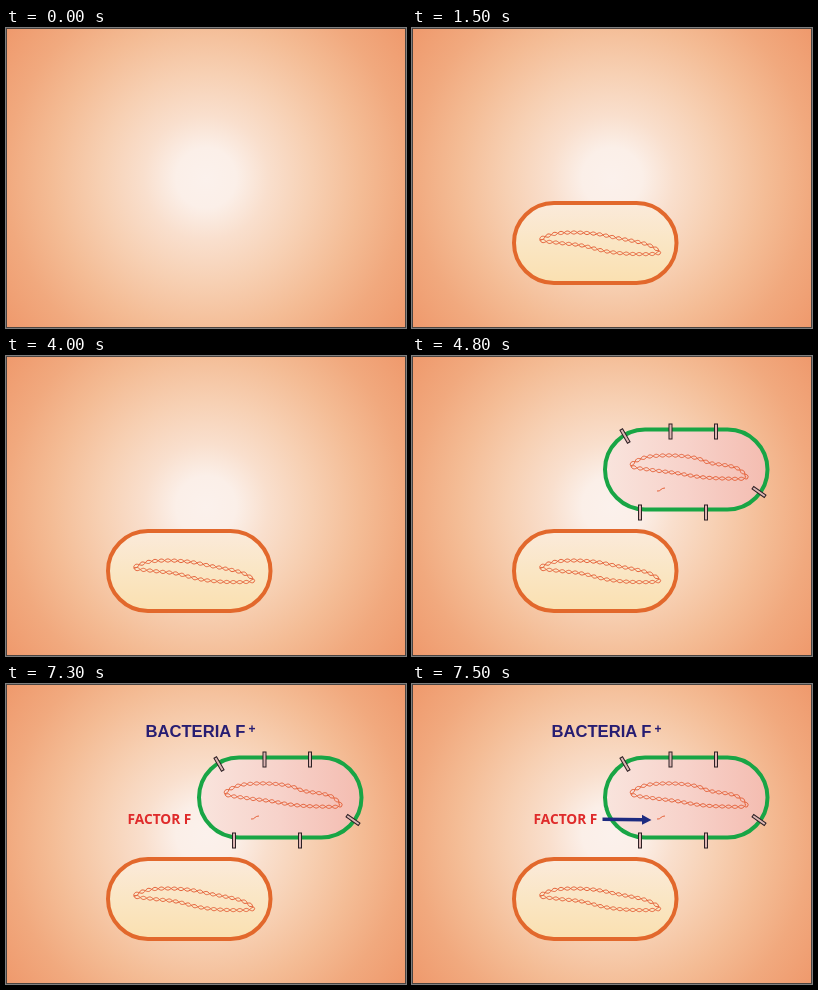
Recreate the animation shown at these times as an HTML page. Size 400 px wide and 300 px high, loop 8000 ms.

```html
<!DOCTYPE html>
<html lang="en">
<head>
<meta charset="utf-8">
<title>Bacteria</title>
<style>
  html, body { margin: 0; width: 100%; height: 100%; overflow: hidden; }
  svg { display: block; width: 400px; height: 300px; }
  [data-on] { visibility: hidden; }
  .cell { stroke-width: 4; }
  .dna, .factor { fill: none; stroke: #e5623a; stroke-width: 1; }
  .pili rect { fill: #dcb6b4; stroke: #2c2024; stroke-width: 1; }
  .label { font: bold 16.6px "Liberation Sans", Arial, sans-serif; fill: #271d72; }
  .sup { font-size: 12px; }
  .name { font: bold 13.7px "Open Sans", "Noto Sans", sans-serif; fill: #df2b2b; }
</style>
</head>
<body>
<svg viewBox="0 0 400 300">
  <defs>
    <radialGradient id="glow" gradientUnits="userSpaceOnUse" cx="200" cy="150" r="250">
      <stop offset="0" stop-color="#fbf1ec"/>
      <stop offset=".12" stop-color="#fbefe8"/>
      <stop offset=".25" stop-color="#f9dfcd"/>
      <stop offset=".42" stop-color="#f7d0b3"/>
      <stop offset=".62" stop-color="#f4bc95"/>
      <stop offset=".8" stop-color="#f1a97e"/>
      <stop offset="1" stop-color="#ef996c"/>
    </radialGradient>
    <linearGradient id="cream" x2="0" y2="1">
      <stop offset="0" stop-color="#fbeadb"/>
      <stop offset=".5" stop-color="#fae6c4"/>
      <stop offset="1" stop-color="#fae0b0"/>
    </linearGradient>
    <linearGradient id="pink">
      <stop offset="0" stop-color="#f9e4dd"/>
      <stop offset=".5" stop-color="#f7d2ca"/>
      <stop offset="1" stop-color="#f4bcb0"/>
    </linearGradient>
  </defs>

  <rect width="400" height="300" fill="url(#glow)"/>
  <rect x=".5" y=".5" width="399" height="299" fill="none" stroke="#4a4340"/>

  <g data-on="1500">
    <rect class="cell" x="102" y="175" width="162.5" height="80" rx="40" fill="url(#cream)" stroke="#e2682c"/>
    <g class="dna" data-loop="128,212 142,206 162,204.5 185,206 205,210 226,214 239,218 247,225 222,226 195,223.5 170,217.5 148,215"></g>
  </g>
  <text class="label" data-on="2500" data-off="4000" x="71" y="150">BACTERIA F<tspan class="sup" dx="3" dy="-4">–</tspan></text>

  <g data-on="4800">
    <rect class="cell" x="193" y="73.5" width="162.5" height="80" rx="40" fill="url(#pink)" stroke="#18a545"/>
    <g class="dna" data-loop="219,110 231,102 250,99.5 270,100 286,102.5 298,107 318,110 328,114 334,122 312,122.5 288,121 264,117 240,114"></g>
    <path class="factor" d="M245 135q2.500 .5 4-1.500q1.500-1.500 4-1.500"/>
    <g class="pili"></g>
  </g>
  <text class="label" data-on="5800" x="139.500" y="53">BACTERIA F<tspan class="sup" dx="3" dy="-4">+</tspan></text>
  <text class="name" data-on="7300" x="121.500" y="140">FACTOR F</text>
  <path data-on="7500" fill="#1d2b80" d="M190.500 133.500L230 134v-3.200L239.500 136L230 140.800v-3.200L190.500 137z"/>
</svg>
<script>
const NS = "http://www.w3.org/2000/svg";
const LOOP = 8000;

function add(parent, tag, attrs) {
  const el = parent.appendChild(document.createElementNS(NS, tag));
  for (const key in attrs) el.setAttribute(key, attrs[key]);
  return el;
}

// Closed smooth curve through the given points
function smoothPath(pts) {
  const n = pts.length, at = i => pts[(i + n) % n];
  const handle = (i, s) => at(i).map((v, k) => v + s * (at(i + 1)[k] - at(i - 1)[k]) / 6);
  return "M" + pts[0] + pts.map((_, i) => "C" + [handle(i, 1), handle(i + 1, -1), at(i + 1)].join(" ")).join("") + "Z";
}

// Two strands winding around the curve
function drawDna(group) {
  const pts = group.dataset.loop.split(" ").map(p => p.split(",").map(Number));
  const guide = add(group, "path", { d: smoothPath(pts) });
  const length = guide.getTotalLength();
  const turns = Math.round(length / 13);
  for (const side of [-1, 1]) {
    const strand = [];
    for (let s = 0; s < length; s++) {
      const a = guide.getPointAtLength(s), b = guide.getPointAtLength((s + 1) % length);
      const dx = b.x - a.x, dy = b.y - a.y, d = Math.hypot(dx, dy) || 1;
      const off = side * 1.6 * Math.sin(2 * Math.PI * turns * s / length);
      strand.push((a.x - dy / d * off).toFixed(2) + "," + (a.y + dx / d * off).toFixed(2));
    }
    add(group, "polygon", { points: strand.join(" ") });
  }
  guide.remove();
}

document.querySelectorAll(".dna").forEach(drawDna);

const pili = document.querySelector(".pili");
for (const [x, y, turn] of [[213, 80, -30], [258.5, 75.5, 0], [304, 75.5, 0], [347, 136, -55], [228, 156.5, 0], [294, 156.5, 0]])
  add(pili, "rect", { x: -1.5, y: -7.5, width: 3, height: 15, transform: `translate(${x} ${y}) rotate(${turn})` });

const parts = [...document.querySelectorAll("[data-on]")];
const start = performance.now();

function draw() {
  const t = (performance.now() - start) % LOOP;
  for (const el of parts) {
    const shown = t >= +el.dataset.on && t < +(el.dataset.off || LOOP);
    el.style.visibility = shown ? "visible" : "hidden";
  }
  requestAnimationFrame(draw);
}
draw();
</script>
</body>
</html>
```
